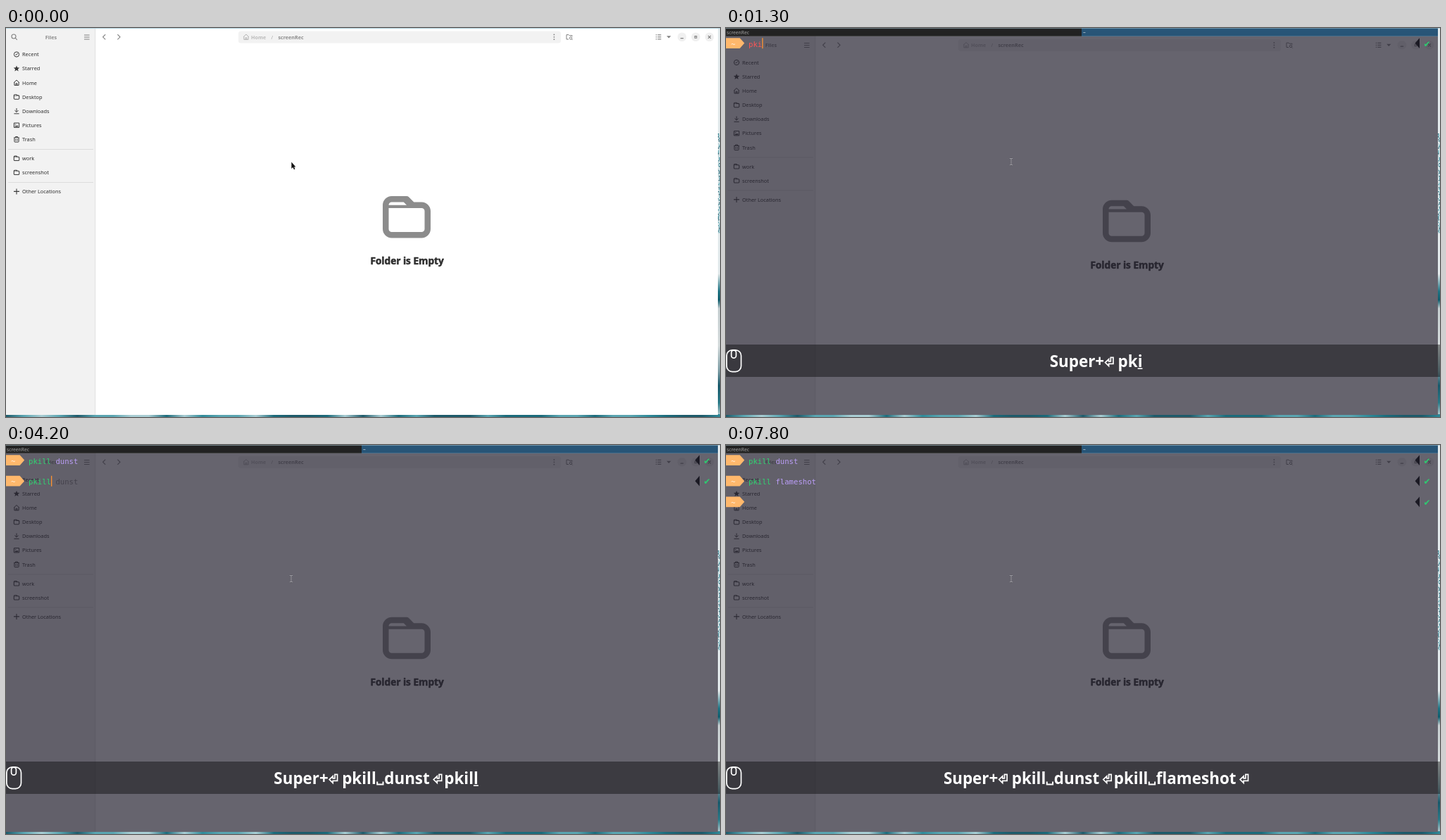
Animation, 1014 px wide and 553 px high, one loop 8 s. Source, as an HTML page with a canvas:

```html
<!DOCTYPE html>
<html lang="en">
<head>
<meta charset="utf-8">
<title>Terminal session</title>
<style>
html, body { margin: 0; width: 100%; height: 100%; overflow: hidden; background: #fff; }
canvas { display: block; width: 1014px; height: 553px; }
</style>
</head>
<body>
<canvas id="stage"></canvas>
<script>
const W = 1014, H = 553, LOOP = 8000;
const canvas = document.getElementById('stage');
const ctx = canvas.getContext('2d');
const dpr = window.devicePixelRatio || 1;
canvas.width = W * dpr;
canvas.height = H * dpr;

const SANS = '"Noto Sans", "Open Sans", sans-serif';
const MONO = '"DejaVu Sans Mono", monospace';
const TERM = [38, 35, 49];
const ENTER = '\n';

// Key presses: [time, key]
const KEYS = [
  [300, 'Super+'], [300, ENTER],
  [900, 'p'], [1100, 'k'], [1300, 'i'], [1500, 'l'], [1600, 'l'], [1800, ' '],
  [2000, 'd'], [2100, 'u'], [2300, 'n'], [2400, 's'], [2600, 't'], [2800, ENTER],
  [3500, 'p'], [3700, 'k'], [3900, 'i'], [4000, 'l'], [4200, 'l'], [4300, ' '],
  [4900, 'f'], [5100, 'l'], [5300, 'a'], [5500, 'm'], [6500, 'e'],
  [6700, 's'], [6800, 'h'], [6900, 'o'], [7000, 't'], [7200, ENTER]
];
const PROMPTS = [[700, 2800], [2900, 7200], [7300, LOOP + 1]];

function rect(x, y, w, h, color) {
  ctx.fillStyle = color;
  ctx.fillRect(x, y, w, h);
}
function round(x, y, w, h, r, color) {
  ctx.beginPath();
  ctx.roundRect(x, y, w, h, r);
  ctx.fillStyle = color;
  ctx.fill();
}
function text(s, x, y, font, color, align = 'left') {
  ctx.font = font;
  ctx.textAlign = align;
  ctx.fillStyle = color;
  ctx.fillText(s, x, y);
}
function stroke(d, color, width = 1) {
  ctx.strokeStyle = color;
  ctx.lineWidth = width;
  ctx.stroke(new Path2D(d));
}
function fill(d, color, rule = 'nonzero') {
  ctx.fillStyle = color;
  ctx.fill(new Path2D(d), rule);
}
function at(x, y, draw) {
  ctx.save();
  ctx.translate(x, y);
  draw();
  ctx.restore();
}
function random(seed) {
  return () => (seed = (seed * 16807) % 2147483647) / 2147483647;
}

// Folder on a 16 unit grid, centred on the origin
function folder(scale, color) {
  ctx.save();
  ctx.scale(scale, scale);
  ctx.translate(-8, -8);
  fill('M3 1C1.36 1 0 2.36 0 4V12C0 13.64 1.36 15 3 15H13C14.64 15 16 13.64 16 12V6C16 4.36 14.64 3 13 3H10.41L8.71 1.29C8.52 1.1 8.27 1 8 1Z' +
    'M2 5H13C13.57 5 14 5.43 14 6V12C14 12.57 13.57 13 13 13H3C2.43 13 2 12.57 2 12Z' +
    'M3 3H7L8 4H2C2 3.43 2.43 3 3 3Z', color, 'evenodd');
  ctx.restore();
}

const ICONS = {
  recent: c => stroke('M3.6 0A3.6 3.6 0 1 1 -3.6 0A3.6 3.6 0 1 1 3.6 0M1.8-1.6L0 .4L-1.5 .4', c),
  star: c => fill('M0-4.2L1.2-1.4L4.2-1.2L1.9 .8L2.6 3.8L0 2.2L-2.6 3.8L-1.9 .8L-4.2-1.2L-1.2-1.4Z', c),
  home: c => stroke('M-4 0L0-3.8L4 0M-3.1-.6V3.6H3.1V-.6M-.9 3.6V1H.9V3.6', c),
  folder: c => folder(.53, c),
  down: c => stroke('M0-4V1.4M-2.6-1L0 1.6L2.6-1M-3.6 3.8H3.6', c),
  picture: c => {
    stroke('M-3.6-3.2H3.6V3.2H-3.6Z', c);
    fill('M-2.6 2.2L-1 .1L.2 1.2L1.3-.3L2.6 2.2ZM-2.2-1.8H-.8V-.6H-2.2Z', c);
  },
  trash: c => stroke('M-3.9-2.4H3.9M-1.5-2.6V-3.8H1.5V-2.6M-3.1-2.2V3Q-3.1 3.8-2.3 3.8H2.3Q3.1 3.8 3.1 3V-2.2M-1.1-.4V2M1.1-.4V2', c),
  plus: c => stroke('M-4 0H4M0-4V4', c, 1.1)
};
const PLACES = [
  ['recent', 'Recent', 37.5], ['star', 'Starred', 57.6], ['home', 'Home', 77.8],
  ['folder', 'Desktop', 98], ['down', 'Downloads', 118], ['picture', 'Pictures', 138.2],
  ['trash', 'Trash', 158.3], ['folder', 'work', 185.3], ['folder', 'screenshot', 205.4],
  ['plus', 'Other Locations', 232.4]
];

function wallpaper() {
  rect(0, 0, W, H, '#e3eaec');
  rect(0, 0, W, 1, '#b4d4e0');
  const rnd = random(77);
  const teal = ['#1b6b7b', '#2f8a99', '#5aa5b1', '#a9cdd3', '#1d5a6a'];
  const pick = () => teal[Math.floor(rnd() * teal.length)];
  for (let y = 150; y < 292; y += 2) rect(1011 + rnd() * 2, y, 1.6, 1.4, pick());
  const side = ctx.createLinearGradient(0, 350, 0, 553);
  [[0, '#dfe6e7'], [.12, '#1f7484'], [.18, '#0f5c6c'], [.24, '#c6cfd1'], [.5, '#d6dcdd'],
   [.68, '#7d9da5'], [.78, '#17586a'], [.9, '#2a7a88'], [1, '#cdd9da']]
    .forEach(([p, c]) => side.addColorStop(p, c));
  rect(1011, 350, 3, 203, side);
  const floor = ctx.createLinearGradient(0, 0, W, 0);
  for (let i = 0; i <= 40; i++) floor.addColorStop(i / 40, pick());
  rect(0, 549, W, 4, floor);
}

function header() {
  const g = '#808080';
  stroke('M14 12A3 3 0 1 1 8 12A3 3 0 1 1 14 12M13.2 14.2L15.8 16.8', g, 1.1);
  text('Files', 64, 15.7, `bold 7.3px ${SANS}`, '#8c8c8c', 'center');
  stroke('M111 10H118.6M111 13H118.6M111 16H118.6', g);
  stroke('M141.2 9.2L137.6 12.8L141.2 16.4M158.4 9.2L162 12.8L158.4 16.4', g, 1.1);
  round(330, 4.5, 458, 17, 3.5, '#f2f2f2');
  at(341, 12.8, () => ICONS.home('#b4b4b4'));
  text('Home', 348, 15.5, `bold 7.2px ${SANS}`, '#bbb');
  text('/', 376.5, 15.5, `7.2px ${SANS}`, '#aaa');
  text('screenRec', 386.4, 15.5, `bold 7.2px ${SANS}`, '#8c8c8c');
  for (const y of [9.4, 12.8, 16.2]) round(777.5, y - .9, 1.8, 1.8, .9, g);
  at(800, 12.8, () => {
    stroke('M-1 3.2H-4V-3.2H-.9L.2-2.1H4V-.8M3.8 1.6A1.7 1.7 0 1 1 .4 1.6A1.7 1.7 0 1 1 3.8 1.6M3.4 3L4.6 4.2', g);
  });
  for (const y of [9.8, 12.8, 15.8]) {
    rect(922.8, y - .6, 1.4, 1.2, g);
    rect(925.4, y - .6, 5, 1.2, g);
  }
  fill('M938.2 11.2H944.4L941.3 14.6Z', g);
  for (const x of [960, 979.5, 999]) round(x - 6.3, 6.5, 12.6, 12.6, 6.3, '#f0f0f0');
  stroke('M957.8 14.6H962.2M978.2 11.6H980.8V14.2H978.2ZM997 10.8L1001 14.8M1001 10.8L997 14.8', g, 1.1);
}

function emptyNote() {
  at(569, 268.8, () => folder(4.25, '#8c8c8c'));
  const label = 'Folder is Empty';
  text(label, 569.6, 336.4, `800 13.65px ${SANS}`, '#2e2e2e', 'center');
  ctx.strokeStyle = '#2e2e2e';
  ctx.lineWidth = .5;
  ctx.strokeText(label, 569.6, 336.4);
}

function files(tabbed) {
  const dy = tabbed ? 11.5 : 0;
  rect(0, 1, 1011, 549, '#fff');
  rect(0, 1, 127, 549, '#f2f2f2');
  rect(126.3, 1, .9, 549, '#dfdfdf');
  at(0, dy, () => {
    header();
    for (const y of [172, 219]) rect(3, y, 121, .8, '#d8d8d8');
    for (const [icon, label, y] of PLACES) {
      at(15, y, () => ICONS[icon]('#3a3a3a'));
      text(label, 23, y + 2.7, `7.35px ${SANS}`, '#2e2e2e');
    }
  });
  at(0, dy / 2, emptyNote);
}

function tabs(title) {
  rect(0, .5, 505, 11.3, '#222');
  rect(505, .5, 506, 11.3, '#285577');
  text('screenRec', 1, 8.9, `6.7px ${SANS}`, '#a6a6a6');
  text(title, 507, 8.9, `6.7px ${SANS}`, '#fff');
}

function typed(from, to, now) {
  return KEYS.filter(([t, k]) => t > from && t < to && t <= now && k.length === 1);
}

function prompt(row, now) {
  const [start, end] = PROMPTS[row];
  if (now < start) return;
  const y = 14.2 + row * 29.6, col = 6.4;
  const keys = typed(start, end, now);
  const line = keys.map(k => k[1]).join('');
  const font = `10.63px ${MONO}`;
  const base = y + 12.5;
  fill(`M0 ${y}H19.6L26.2 ${y + 7.4}L19.6 ${y + 14.8}H0Z`, '#ffb86c');
  text('~', 7, base, font, '#fff0de');
  fill(`M985 ${y}V${y + 14.8}L978.6 ${y + 7.4}Z`, '#1b1a24');
  text('✔', 990.6, base, '12px "DejaVu Sans", sans-serif', '#2ecc71');

  const cmd = line.slice(0, 5);
  text(cmd, 32, base, font, cmd === 'pkill' ? '#2fd671' : '#ff5555');
  text(line.slice(6), 32 + 6 * col, base, font, '#bb9df8');
  const hint = 'pkill dunst';
  if (row === 1 && line && now >= 3600 && hint.startsWith(line))
    text(hint.slice(line.length), 32 + line.length * col, base, font, '#44424c');

  const idle = keys.length ? now - keys[keys.length - 1][0] - 600 : now - start - 500;
  if (now < end && idle < 0)
    rect(32 + line.length * col, y, 1.3, 15, '#ff9330');
}

function enterMark(x) {
  at(x, 0, () => {
    stroke('M9.2 468.4H12.8V477.4H6.4V480.4L1.4 475.6L6.4 470.8V473.8H9.2Z', '#fff', 1.7);
  });
}

function keyBar(now) {
  rect(0, 450, W, 46, 'rgba(0,0,0,.41)');
  const pressed = KEYS.filter(k => k[0] <= now);
  const font = `bold 22.4px ${SANS}`;
  ctx.font = font;

  // Lay out runs: consecutive letters share one run
  const runs = [];
  let x = 0;
  let word = null;
  pressed.forEach(([t, key], i) => {
    const special = key === ENTER || key === ' ';
    if (special) {
      word = null;
      if (key === ENTER && i > 1) x += 4.2;
      const w = key === ENTER ? 13.6 : 11.5;
      runs.push({ key, x, w, first: i, last: i });
      x += w;
    } else {
      if (!word) {
        if (i === 2) x += 5.8;
        else if (i && pressed[i - 1][1] === ENTER) x += 2.8;
        word = { key: '', x, w: 0, first: i };
        runs.push(word);
      }
      word.key += key;
      word.last = i;
      word.w = ctx.measureText(word.key).width;
      x = word.x + word.w;
    }
  });

  // The latest burst of keys is underlined for a moment
  let burst = pressed.length;
  const last = pressed.length - 1;
  if (now - pressed[last][0] < 200) {
    burst = last;
    while (burst > 0 && pressed[burst][1] !== ' ' &&
           pressed[burst][0] - pressed[burst - 1][0] < 200) burst--;
  }

  const left = 525.6 - x / 2;
  for (const r of runs) {
    const rx = left + r.x;
    if (r.key === ENTER) enterMark(rx);
    else if (r.key === ' ')
      stroke(`M${rx + 1.5} 478.4V482.6H${rx + 9.8}V478.4`, '#fff', 2);
    else text(r.key, rx, 481.6, font, '#fff');
    if (r.last < burst) continue;
    ctx.font = font;
    const skip = r.first < burst
      ? ctx.measureText(r.key.slice(0, burst - r.first)).width : 0;
    rect(rx + skip, r.key === ' ' ? 486.2 : 483.4, r.w - skip, 1.6, '#fff');
  }

  ctx.beginPath();
  ctx.roundRect(.9, 457.8, 20.6, 30.8, 8);
  ctx.roundRect(7.6, 458.2, 6.8, 11, 3.4);
  ctx.strokeStyle = '#fff';
  ctx.lineWidth = 1.7;
  ctx.stroke();
}

function pointer(beam) {
  if (beam) {
    const d = 'M402.8 185.4H404.2L405 186L405.8 185.4H407.2M405 186V194M402.8 194.8H404.2L405 194L405.8 194.8H407.2';
    stroke(d, '#4a4852', 1.8);
    stroke(d, '#c4c3c8', .8);
  } else {
    const d = 'M405.4 190.4V200L407.5 198L409 201.3L410.5 200.6L409.1 197.5H411.4Z';
    stroke(d, '#fff', 1.2);
    fill(d, '#111');
  }
}

function draw(now) {
  ctx.setTransform(dpr, 0, 0, dpr, 0, 0);
  const open = now >= 500, ready = now >= 700;
  wallpaper();
  files(open);
  if (open) {
    rect(0, 11.8, 1011, 538.2, `rgba(${TERM},${now < 600 ? .68 : .7})`);
    tabs(ready ? '~' : 'kitty');
    PROMPTS.forEach((_, row) => prompt(row, now));
  }
  if (now >= 300) keyBar(now);
  pointer(ready);
}

let began = null;
function tick(now) {
  if (began === null) began = now;
  draw((now - began) % LOOP);
  requestAnimationFrame(tick);
}
draw(0);
requestAnimationFrame(tick);
</script>
</body>
</html>
```
